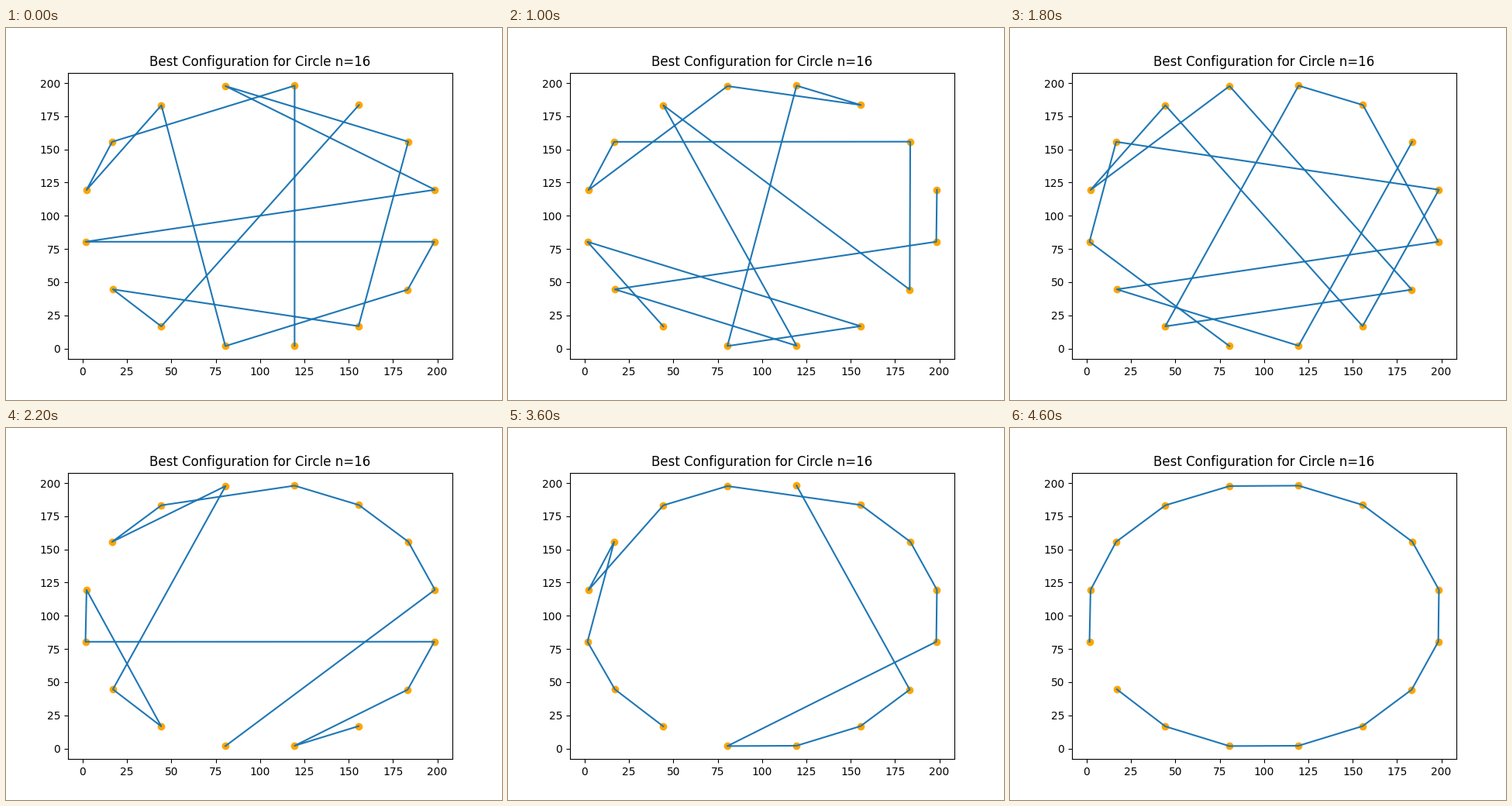
A matplotlib script for the animation above (4.8 s loop, 640x480 px).

```python
import numpy as np
import matplotlib.pyplot as plt
from matplotlib.animation import FuncAnimation

N = 16


def ring(a, b):
    """Neighbouring cities from a to b, in either direction."""
    return [*range(a, b + 1)] if a <= b else [*range(a, b - 1, -1)]


def swaps(tour, goal):
    """Put cities in place by exchanging pairs, in scattered order."""
    tour = list(tour)
    for i in (np.arange(N) * 9 + 6) % N:
        if tour[i] != goal[i]:
            j = tour.index(goal[i])
            tour[i], tour[j] = tour[j], tour[i]
            yield list(tour)


def flips(tour, goal):
    """Put cities in place by reversing stretches, as 2-opt does."""
    tour = list(tour)
    for i, city in enumerate(goal):
        j = tour.index(city)
        if j > i:
            tour[i:j + 1] = tour[i:j + 1][::-1]
            yield list(tour)


def search(tour, goal, steps, method):
    """Tours from one stage of the search up to, not including, the next."""
    states = [tour, *method(tour, goal)]
    return [states[(len(states) - 1) * s // steps] for s in range(steps)]


# Stages of the search, each with its length in steps and kind of change
STAGES = [
    ([2, 10, 9, 13, 1, 4, 0, 8, 15, 14, 11, 5, 7, 6, 3, 12], 3, swaps),
    ([4, 5, 13, 0, 3, 2, 10, 7, 15, 1, 6, 8, 12, 11, 14, 9], 4, swaps),
    ([1, 8, 9, 11, *ring(2, 7), 14, 13, 15, 10, 12, 0], 4, swaps),
    ([13, 12, 14, 15, 8, 7, 10, 9, 4, 6, 5, *ring(3, 0), 11], 4, swaps),
    ([15, 12, 11, 13, 10, 7, 9, 8, 4, 6, 5, *ring(3, 0), 14], 3, flips),
    ([*ring(10, 8), 6, 7, 5, 4, *ring(2, 0), 15, *ring(11, 14), 3], 5, flips),
]
BEST = ring(9, 15) + ring(0, 8)

goals = [tour for tour, _, _ in STAGES[1:]] + [BEST]
tours = []
for (tour, steps, method), goal in zip(STAGES, goals):
    tours += search(tour, goal, steps, method)
tours.append(BEST)

# Cities on a circle whose radius wavers slightly
k = np.arange(N)
angle = 2 * np.pi * (k + 0.5) / N
radius = 100.05 + 0.5 * (1 - k / 20) * np.cos(np.pi * k**2 / N)
x = 100 + radius * np.cos(angle)
y = 100 + radius * np.sin(angle)

fig, ax = plt.subplots(figsize=(6.4, 4.8), dpi=100)
ax.scatter(x, y, color="orange")
path, = ax.plot(x, y)
ax.set_title(f"Best Configuration for Circle n={N}")


def draw(step):
    path.set_data(x[tours[step]], y[tours[step]])
    return path,


anim = FuncAnimation(fig, draw, frames=len(tours), interval=200,
                     repeat=True, repeat_delay=0)
plt.show()
```
